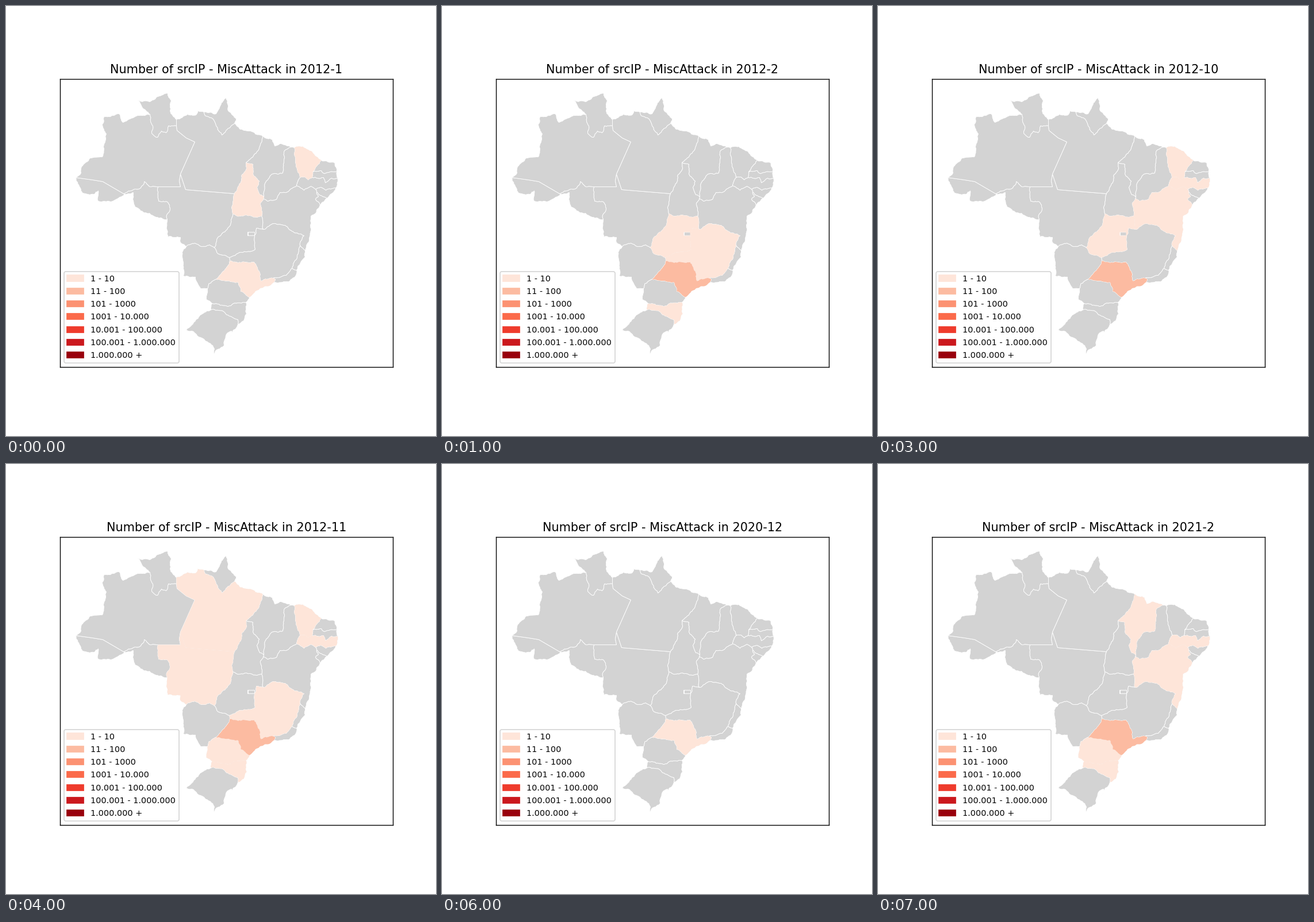
Write a matplotlib script that moves like this. It is 748 by 748 pixels and loops after 8000 ms.

```python
from itertools import combinations
from math import dist

import numpy as np
import matplotlib.pyplot as plt
from matplotlib.animation import FuncAnimation
from matplotlib.patches import Patch, PathPatch
from matplotlib.path import Path

SIZE = 748
LEFT, RIGHT, TOP, BOTTOM = 93.5, 673.2, 127.1, 628.3
GRAY = "#d3d3d3"
REDS = ["#fee5d9", "#fcbba1", "#fc9272", "#fb6a4a", "#ef3b2c", "#cb181d", "#99000d"]
LABELS = ["1 - 10", "11 - 100", "101 - 1000", "1001 - 10.000",
          "10.001 - 100.000", "100.001 - 1.000.000", "1.000.000 +"]

# Where three regions meet; "land" and "sea" lie outside the country.
# Two regions share the border that runs between their two junctions.
JUNCTIONS = {
    "AC AM land": (121, 298), "AC AM RO": (204, 326), "AC RO land": (206, 327),
    "AM RR land": (250, 188), "AM PA RR": (296, 208), "PA RR land": (296, 197),
    "AP PA land": (344, 184), "AP land sea": (365, 187), "AP PA sea": (397, 204),
    "AM MT RO": (264, 314), "AM MT PA": (303, 292), "MT RO land": (280, 371),
    "MS MT land": (313, 418), "GO MS MT": (362, 420), "GO MG MS": (388, 437),
    "MG MS SP": (389, 443), "MS PR SP": (365, 475), "MS PR land": (350, 491),
    "PR SC land": (358, 517), "RS SC land": (356, 528), "RS land sea": (361, 605),
    "RS SC sea": (403, 553), "PR SC sea": (417, 515), "PR SP sea": (423, 506),
    "RJ SP sea": (464, 481), "MG RJ SP": (464, 473), "ES MG RJ": (497, 456),
    "ES RJ sea": (505, 459), "BA ES sea": (520, 425), "BA ES MG": (511, 416),
    "BA GO MG": (447, 388), "BA GO TO": (444, 365), "GO MT TO": (394, 361),
    "MT PA TO": (397, 326), "MA PA TO": (417, 272), "MA PA sea": (446, 226),
    "MA PI TO": (448, 332), "BA PI TO": (447, 335), "MA PI sea": (495, 245),
    "CE PI sea": (501, 246), "CE PE PI": (511, 298), "BA PE PI": (505, 312),
    "CE RN sea": (548, 268), "CE PB RN": (533, 288), "CE PB PE": (532, 298),
    "PB RN sea": (575, 288), "PB PE sea": (577, 300), "AL PE sea": (573, 316),
    "AL BA PE": (538, 318), "AL BA SE": (540, 323), "AL SE sea": (558, 334),
    "BA SE sea": (546, 346),
}

# Main bends on the way from one junction to the other.
BENDS = {
    "AC AM": [(150, 302), (168, 305)],
    "AC land": [(124, 306), (133, 325), (153, 327), (160, 321), (160, 339), (182, 340)],
    "AM land": [(130, 290), (131, 279), (146, 264), (167, 262), (174, 222), (167, 206),
                (170, 192), (185, 190), (196, 187), (203, 202), (232, 190)],
    "AM RR": [(251, 200), (255, 208), (253, 221), (263, 228), (270, 217), (278, 220),
              (282, 208)],
    "RR land": [(236, 175), (229, 164), (250, 166), (264, 157), (280, 151), (287, 165),
                (285, 182)],
    "PA land": [(315, 188), (330, 189), (333, 182)],
    "AP sea": [(373, 172), (382, 159), (387, 183), (400, 196)],
    "AP PA": [(347, 191), (360, 196), (375, 224), (385, 213)],
    "PA sea": [(407, 214), (430, 219)],
    "AM PA": [(297, 216), (313, 229), (328, 236)],
    "AM MT": [(303, 314), (301, 304)],
    "MT PA": [(312, 319)],
    "MT RO": [(265, 339), (281, 341), (285, 352), (279, 363)],
    "AM RO": [(221, 319), (234, 316), (240, 305), (252, 314)],
    "RO land": [(221, 324), (221, 338), (224, 349), (234, 356), (249, 360), (261, 367)],
    "MT land": [(279, 384), (281, 401), (303, 402), (304, 412)],
    "MS MT": [(328, 412), (340, 418), (354, 415)],
    "GO MT": [(388, 383), (366, 406)],
    "GO MS": [(366, 428)],
    "GO TO": [(400, 364), (424, 364), (436, 367)],
    "MT TO": [(392, 350)],
    "PA TO": [(417, 285), (410, 293), (408, 307), (402, 317)],
    "MA PA": [(440, 246), (431, 258)],
    "MA TO": [(429, 275), (430, 294), (440, 304), (436, 315), (441, 328)],
    "MA sea": [(463, 232), (467, 243), (476, 239)],
    "MA PI": [(484, 251), (483, 270), (481, 290), (462, 292), (450, 308)],
    "CE PI": [(503, 272)],
    "CE sea": [(516, 244), (532, 253)],
    "RN sea": [(571, 272)],
    "CE RN": [(540, 278)],
    "PB RN": [(548, 286), (553, 291), (563, 288)],
    "PB PE": [(552, 298), (555, 307), (566, 299)],
    "CE PE": [(519, 297), (525, 302)],
    "BA PE": [(518, 320), (530, 313)],
    "AL PE": [(546, 315), (556, 320)],
    "BA SE": [(543, 331), (538, 336)],
    "BA PI": [(454, 339), (470, 336), (476, 324), (489, 323)],
    "BA TO": [(442, 342), (445, 358)],
    "BA sea": [(539, 359), (530, 365), (528, 400)],
    "BA MG": [(466, 378), (485, 381), (499, 392), (518, 399)],
    "GO MG": [(435, 386), (432, 400), (433, 423), (408, 428)],
    "MG SP": [(400, 445), (431, 445), (440, 461), (443, 478)],
    "MG RJ": [(487, 468), (494, 460)],
    "ES MG": [(506, 435)],
    "ES sea": [(520, 436)],
    "RJ sea": [(493, 478), (504, 468)],
    "RJ SP": [(468, 475)],
    "SP sea": [(455, 487), (441, 491)],
    "PR SP": [(403, 480), (408, 496)],
    "MS SP": [(381, 457)],
    "MS PR": [(352, 483)],
    "MS land": [(306, 428), (308, 469), (329, 471), (338, 491)],
    "PR land": [(348, 510)],
    "PR SC": [(386, 522), (402, 516)],
    "RS SC": [(378, 531), (395, 542), (403, 545)],
    "SC sea": [(418, 535), (413, 547)],
    "RS sea": [(398, 562), (388, 577), (392, 565), (385, 568), (380, 580), (379, 590),
               (367, 597)],
    "RS land": [(362, 596), (359, 590), (344, 579), (332, 573), (326, 566), (313, 563),
                (330, 545), (343, 534)],
}
STRAIGHT = {"AC AM", "AM MT", "AM PA", "MT PA", "PA RR"}
DISTRICT = [(420, 393), (420, 399), (431, 399), (431, 393)]

# Month, states in the lowest class, states in the second class.
MONTHS = [
    ("2012-1", "CE TO SP", ""),
    ("2012-2", "GO MG SC", "SP"),
    ("2012-3", "GO", "SP"),
    ("2012-10", "CE PE BA GO", "SP"),
    ("2012-11", "PA MT CE PE MG PR SC", "SP"),
    ("2012-12", "MT AL MG SC", "SP"),
    ("2020-12", "SP", ""),
    ("2021-2", "MA BA PE PR SC", "SP"),
]

rng = np.random.default_rng(4)


def roughen(pts):
    """Split long segments and nudge each midpoint sideways."""
    for _ in range(4):
        out = [pts[0]]
        for a, b in zip(pts[:-1], pts[1:]):
            length = dist(a, b)
            if length > 3.5:
                dx, dy = (b - a) / length
                shift = rng.uniform(-1, 1) * min(0.15 * length, 1.3)
                out.append((a + b) / 2 + shift * np.array([-dy, dx]))
            out.append(b)
        pts = np.array(out)
    return pts


def length(pts):
    return sum(dist(a, b) for a, b in zip(pts[:-1], pts[1:]))


def trace_borders():
    ends = {}
    for name, point in JUNCTIONS.items():
        for pair in combinations(name.split(), 2):
            ends.setdefault(" ".join(pair), []).append(point)
    ends.pop("land sea")
    borders = {}
    for pair, (a, b) in ends.items():
        bends = BENDS.get(pair, [])
        pts = min([a, *bends, b], [b, *bends, a], key=length)
        pts = np.array(pts) + 0.5
        borders[pair] = pts if pair in STRAIGHT else roughen(pts)
    return borders


def ring(state):
    """Chain a state's borders end to end."""
    todo = [pts for pair, pts in borders.items() if state in pair.split()]
    chain = todo.pop(0)
    while todo:
        tip = chain[-1]
        gaps = [min(dist(p[0], tip), dist(p[-1], tip)) for p in todo]
        nxt = todo.pop(int(np.argmin(gaps)))
        if dist(nxt[0], tip) > dist(nxt[-1], tip):
            nxt = nxt[::-1]
        chain = np.vstack([chain, nxt])
    return chain


def closed(pts, turn=1):
    """Closed path that runs round in the given sense."""
    x, y = pts.T
    area = np.sum(x * np.roll(y, -1) - y * np.roll(x, -1))
    if area * turn < 0:
        pts = pts[::-1]
    return Path(np.vstack([pts, pts[:1]]), closed=True)


borders = trace_borders()
states = sorted({s for pair in borders for s in pair.split()} - {"land", "sea"})
shapes = {state: closed(ring(state)) for state in states}

# The federal district is a hole in the state around it.
district = np.array(DISTRICT) + 0.5
shapes["GO"] = Path.make_compound_path(shapes["GO"], closed(district, -1))
shapes["DF"] = closed(district)

fig = plt.figure(figsize=(6, 6), dpi=SIZE / 6, facecolor="white")
ax = fig.add_axes([LEFT / SIZE, 1 - BOTTOM / SIZE,
                   (RIGHT - LEFT) / SIZE, (BOTTOM - TOP) / SIZE])
ax.set(xlim=(LEFT, RIGHT), ylim=(BOTTOM, TOP), xticks=[], yticks=[])
title = ax.set_title("")

fills = {}
for state, path in shapes.items():
    ax.add_patch(PathPatch(path, fc=GRAY, ec="white", lw=0.5, zorder=1))
    fills[state] = ax.add_patch(PathPatch(path, lw=0, zorder=2, visible=False))

ax.legend(handles=[Patch(color=c, label=t) for c, t in zip(REDS, LABELS)],
          loc="lower left", fontsize="small", labelspacing=0.575)


def draw(i):
    month, *classes = MONTHS[i]
    title.set_text(f"Number of srcIP - MiscAttack in {month}")
    for fill in fills.values():
        fill.set_visible(False)
    for color, names in zip(REDS, classes):
        for state in names.split():
            fills[state].set_facecolor(color)
            fills[state].set_visible(True)
    return [title, *fills.values()]


anim = FuncAnimation(fig, draw, frames=len(MONTHS), interval=1000,
                     repeat=True, repeat_delay=0)
plt.show()
```
